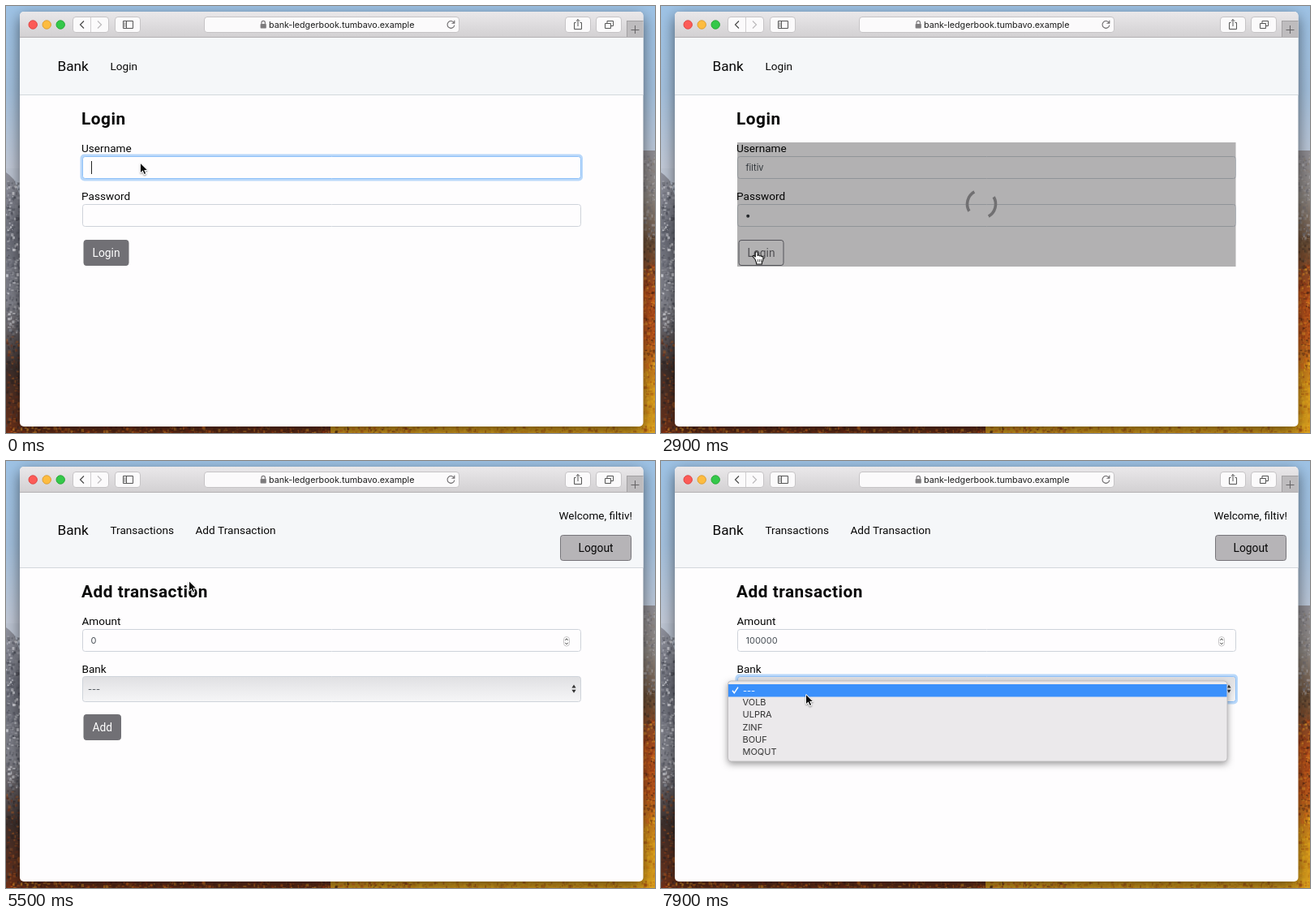
An HTML page with a canvas that plays this animation: 800x526 px, repeating every 8 s.

```html
<!DOCTYPE html>
<html lang="en">
<head>
<meta charset="utf-8">
<title>Bank login demo</title>
<style>
html, body { margin: 0; width: 100%; height: 100%; overflow: hidden; }
canvas { display: block; }
</style>
</head>
<body>
<canvas id="stage" width="800" height="526"></canvas>
<script>
const W = 800, H = 526, LOOP = 8000, STEP = 100;
const USER = 'filtiv', SITE = 'bank-ledgerbook.tumbavo.example';
const BANKS = ['VOLB', 'ULPRA', 'ZINF', 'BOUF', 'MOQUT'];
const ROBOTO = 'Roboto, sans-serif', INTER = 'Inter, sans-serif';
const PAGE = '#fefdfe', GREY = '#717075', LINE = '#ced3da', INK = '#495057';

const stage = document.getElementById('stage').getContext('2d');
const backdrop = document.createElement('canvas');
backdrop.width = W;
backdrop.height = H;
let c = backdrop.getContext('2d');

function box(x, y, w, h, r, fill, stroke) {
  c.beginPath();
  c.roundRect(x, y, w, h, r);
  if (fill) { c.fillStyle = fill; c.fill(); }
  if (stroke) { c.strokeStyle = stroke; c.lineWidth = 1; c.stroke(); }
}

function text(s, x, y, size = 13.6, { color = '#080808', weight = 400, family = ROBOTO, align = 'left', gap = 0 } = {}) {
  c.font = `${weight} ${size}px ${family}`;
  c.letterSpacing = gap + 'px';
  c.textAlign = align;
  c.fillStyle = color;
  c.fillText(s, x, y);
}

function path(d, stroke, width = 1, fill) {
  const p = new Path2D(d);
  if (fill) { c.fillStyle = fill; c.fill(p); }
  if (stroke) { c.strokeStyle = stroke; c.lineWidth = width; c.stroke(p); }
}

function fade(y0, y1, ...colors) {
  const g = c.createLinearGradient(0, y0, 0, y1);
  colors.forEach((col, i) => g.addColorStop(i / (colors.length - 1), col));
  return g;
}

// ---- desktop and browser window, drawn once ----
let seed = 7;
function rand() {
  seed = (seed * 16807) % 2147483647;
  return seed / 2147483647;
}

function speckle(x, y, w, h, count, colors) {
  for (let i = 0; i < count; i++) {
    c.globalAlpha = 0.2 + rand() * 0.5;
    c.fillStyle = colors[Math.floor(rand() * colors.length)];
    c.fillRect(x + rand() * w, y + rand() * h, 1 + rand() * 3, 1 + rand() * 3);
  }
  c.globalAlpha = 1;
}

function desktop() {
  const rock = ['#e0e1e6', '#43454f', '#8b8d96', '#5b5d68'];
  const leaves = ['#d9691c', '#8e2f12', '#e0932a', '#4d2413'];
  const gold = ['#f0b422', '#d98a14', '#a85312', '#e6a81c'];
  c.fillStyle = fade(0, 205, '#9ec3e6', '#a3c0dd', '#c3c9d6');
  c.fillRect(0, 0, W, H);
  c.fillStyle = fade(205, H, '#8f919c', '#6b6d78', '#80818a', '#3c2f2c', '#6b3018');
  c.fillRect(0, 205, 400, 321);
  c.fillStyle = fade(178, H, '#8e8c92', '#8a847f', '#6a4c34', '#a94b1c', '#b9561a', '#d0901c', '#dda31e');
  c.fillRect(400, 178, 400, 348);
  c.fillStyle = '#bcc4d2';
  path('M0 200H18V236L10 214L4 208L0 205Z', null, 1, '#bcc4d2');
  speckle(0, 215, 17, 190, 330, rock);
  speckle(0, 405, 17, 121, 170, ['#2c2322', '#7b3318', '#a95a24', '#4c4546']);
  speckle(785, 182, 15, 105, 150, ['#b2b0b4', '#6d6b70', '#8b8178']);
  speckle(785, 280, 15, 45, 70, ['#3d2d22', '#7e6246', '#5b432f']);
  speckle(785, 318, 15, 125, 220, leaves);
  speckle(785, 435, 15, 91, 150, gold);
  speckle(0, 518, 500, 8, 500, leaves);
  speckle(440, 518, 360, 8, 450, gold);
}

function roundButton(x, w) {
  box(x + 0.5, 13.5, w, 19, 3.5, '#fbfafb', '#c6c4c6');
}

function browser() {
  c.save();
  c.shadowColor = 'rgba(0,0,0,.55)';
  c.shadowBlur = 18;
  c.shadowOffsetY = 6;
  box(17, 7, 768.5, 511, 5, PAGE);
  c.restore();
  box(17, 7, 768.5, 32, [5, 5, 0, 0], fade(7, 39, '#eae8ea', '#d2d0d2'));
  c.fillStyle = '#b3b1b3';
  c.fillRect(17, 38, 768.5, 1);
  [['#fc5b57', '#df4744'], ['#fdbc40', '#de9f34'], ['#34c84a', '#27aa35']].forEach(([f, s], i) =>
    box(28 + i * 17, 17.8, 10.4, 10.4, 5.2, f, s));

  roundButton(82, 44);
  path('M104.5 14V32', '#d0ced0');
  path('M96 18.5L91.5 23L96 27.5', '#4a4a4a', 1.2);
  path('M113 18.5L117.5 23L113 27.5', '#bcbabc', 1.2);
  roundButton(134, 31);
  path('M144.5 18.5H156.5V27.5H144.5ZM148.5 18.5V27.5M145.5 21H147.5M145.5 23H147.5M145.5 25H147.5', '#555');
  roundButton(244, 314);
  path('M315 22V20.5A2.2 2.2 0 0 1 319.4 20.5V22', '#7d7b7d', 1.2);
  box(313.6, 22, 7.2, 5.6, 0.8, '#7d7b7d');
  text(SITE, 324, 27, 10.7, { family: INTER, color: '#1c1c1c' });
  path('M552.4 21A4.4 4.4 0 1 0 552.8 23.5M552.8 17.8V21.2H549.4', '#6c6a6c', 1.1);
  roundButton(689, 31);
  path('M702.5 20.5H700.5V28.5H709.5V20.5H707.5M705 25V16.5M702.7 18.8L705 16.5L707.3 18.8', '#555');
  roundButton(727, 31);
  path('M738.5 21.5H745.5V27.5H738.5ZM741 21V18.5H748.5V24.5H746', '#555');
  c.fillStyle = '#bebcbe';
  c.fillRect(765, 18, 20.5, 20);
  path('M765.5 18.5H785.5M765.5 18V38', '#a3a1a3');
  path('M775.5 24V34M770.5 29.5H780.5', '#656365');
}

// ---- page parts ----
const button = { x: 95.5 };

function nav(height, mid) {
  c.fillStyle = '#f5f7f9';
  c.fillRect(17, 39, 768.5, height);
  c.fillStyle = '#d3d8dc';
  c.fillRect(17, 39 + height, 768.5, 1);
  text('Bank', 63.5, mid + 6, 17.2);
}

function title(s, y) {
  text(s, 93, y, 20.8, { weight: 600, gap: 0.5 });
}

function ring(y, h) {
  box(91.5, y - 2.5, 619.5, h + 5, 5, '#b9d8fa');
}

function field(y, value, focus, caretX) {
  if (focus) ring(y, 28);
  box(94.5, y + 0.5, 614, 27, 3, PAGE, focus ? '#8fc1f8' : LINE);
  if (value) text(value, 104.5, y + 18, 11, { family: INTER, color: INK });
  if (focus) {
    const x = caretX || 105 + (value ? c.measureText(value).width : 0);
    c.fillStyle = '#222';
    c.fillRect(Math.round(x), y + 6, 1, 16);
  }
}

function mainButton(label, y, w, hover) {
  box(button.x + 0.5, y + 0.5, w - 1, 31, 3, hover ? PAGE : GREY, hover ? '#77767f' : GREY);
  text(label, button.x + w / 2, y + 20.7, 13.8, { align: 'center', color: hover ? GREY : '#fff' });
}

function loader(y, h, cy, t) {
  c.fillStyle = 'rgba(0,0,0,.3)';
  c.fillRect(94, y, 614.5, h);
  const turn = (t - 5000) / 1200 * Math.PI * 2;
  c.strokeStyle = '#717072';
  c.lineWidth = 3.6;
  for (const start of [-120, 60]) {
    const a = start * Math.PI / 180 + turn;
    c.beginPath();
    c.arc(395, cy, 17.5, a, a + Math.PI / 2);
    c.stroke();
  }
}

function keyIcon() {
  box(683.5, 253, 5.4, 5.4, 2.7, '#111');
  path('M686.2 257V263.5M686.2 261.5H687.8', '#111', 1.8);
  path('M690.6 257.2L693.2 259.8L695.8 257.2', '#111', 1.4);
}

function loginPage(t) {
  nav(70, 74);
  text('Login', 128.5, 79);
  title('Login', 145.8);
  text('Username', 93, 180);
  text('Password', 93, 239);
  field(185, t < 300 ? '' : t < 700 ? USER.slice(0, 2) : USER, t < 1000);
  const inPassword = t >= 1000 && t < 2600;
  field(244, '', inPassword, t < 1500 ? 105 : 110);
  if (t >= 1500) box(105.2, 256.7, 4, 4, 2, '#33383e');
  if (inPassword) keyIcon();
  mainButton('Login', 288, 56, t >= 2400);
  if (t >= 2900) loader(168, 153, 244, t);
}

function memberNav(t) {
  nav(92, 85);
  const over = t >= 4200 && t < 5200;
  text('Transactions', 128.5, 90);
  text('Add Transaction', 233.5, 90, 13.6, { color: over ? '#56585c' : '#080808' });
  text(`Welcome, ${USER}!`, 772, 72, 13.5, { align: 'right' });
  box(683.5, 91.5, 87, 31, 3, '#b6b4b7', '#77757a');
  text('Logout', 727, 112, 13.8, { align: 'center' });
}

function listPage() {
  title('Transactions', 167.5);
  const mids = [205, 412, 608];
  const center = { align: 'center' };
  c.fillStyle = '#d6dde3';
  for (const y of [191, 230, 271])
    for (const [x, w] of [[95, 220], [317, 190], [509, 198]]) c.fillRect(x, y, w, 1);
  ['Amount', 'Bank', 'Delete'].forEach((s, i) =>
    text(s, mids[i], 215, 14, { align: 'center', weight: 700, gap: 0.35 }));
  [100, 200].forEach((sum, i) => {
    const y = 255.7 + i * 41.4;
    text(sum, mids[0], y, 13.8, center);
    text(BANKS[i], mids[1], y, 13.8, center);
    box(587.5, y - 12.2, 41, 14, 3, '#fff', '#c4c2c4');
    text('Delete', mids[2], y - 1.8, 9.3, { align: 'center', family: INTER });
  });
}

function stepper() {
  box(687.5, 216.5, 7, 11.5, 3.5, '#fff', '#c8c6c8');
  path('M689.2 220.8L691 218.8L692.8 220.8M689.2 223.8L691 225.8L692.8 223.8', '#444');
}

function popup() {
  c.save();
  c.shadowColor = 'rgba(0,0,0,.42)';
  c.shadowBlur = 9;
  c.shadowOffsetY = 3;
  box(82.5, 271, 615.5, 99, 4, '#ebe9eb');
  c.restore();
  box(82.5, 271, 615.5, 99, 4, null, '#c0bec0');
  c.fillStyle = '#3a90fb';
  c.fillRect(83, 275, 614.5, 15.5);
  path('M88 282.8L90.3 285.8L95 278.6', '#fff', 1.5);
  text('---', 101, 286.5, 11, { family: INTER, color: '#fff' });
  BANKS.forEach((name, i) =>
    text(name, 100.5, 301 + i * 15.25, 11, { family: INTER, color: '#333' }));
}

function amountAt(t) {
  if (t < 6200) return '0';
  if (t < 6500) return '1';
  if (t < 6700) return '10';
  return '100000'.slice(0, Math.min(6, 3 + Math.floor((t - 6700) / STEP)));
}

function addPage(t) {
  title('Add transaction', 167.5);
  text('Amount', 93.5, 202);
  text('Bank', 93.5, 261);
  const open = t >= 7700;
  field(207, amountAt(t), t >= 5900 && !open);
  if (open) ring(265, 32);
  box(94.5, 265.5, 614, 31, 3, fade(265, 297, '#dfdfe2', '#ebebed', '#f6f6f7'), open ? '#8fc1f8' : LINE);
  text('---', 101, 284.5, 11, { family: INTER, color: INK });
  path('M697.4 279.5L700 275.5L702.6 279.5ZM697.4 281.8L700 285.8L702.6 281.8Z', null, 1, '#333');
  mainButton('Add', 312, 46.5);
  if (t < 5500) loader(189.5, 156.5, 260.5, t);
  stepper();
  if (open) popup();
}

// ---- pointer ----
const TRAIL = [
  [0, 166, 194], [1900, 166, 194], [2500, 118, 303], [3200, 118, 303], [3600, 176, 308], [3700, 176, 308],
  [4200, 282, 82], [5100, 282, 82], [5900, 170, 215], [7400, 170, 215], [7900, 179, 288]
];

function pointer(t) {
  if ((t >= 300 && t < 2000) || (t >= 6200 && t < 7500)) return;
  const i = Math.max(1, TRAIL.findIndex(p => p[0] >= t));
  const [t0, x0, y0] = TRAIL[i - 1], [t1, x1, y1] = TRAIL[i];
  const k = (t - t0) / (t1 - t0), e = k * k * (3 - 2 * k);
  c.save();
  c.translate(x0 + (x1 - x0) * e, y0 + (y1 - y0) * e);
  c.lineJoin = 'round';
  if (t >= 2400 && t < 3200) {
    path('M-2 9L-4.5 6.2Q-5.5 4.5-3.8 4.3L-1.7 6V1.2Q-1.6-.2-.3-.2Q1-.2 1.1 1.2V4.4Q2.8 3.4 3.7 5Q5.3 4.2 6 5.7Q8 5.2 8 7.3Q8 10.7 6.4 13V15H-.4V13.2Z', '#151515', 1.1, '#fff');
    path('M1.4 9V12.4M3.5 9V12.4M5.5 9V12.4', '#333', 0.8);
  } else {
    c.shadowColor = 'rgba(0,0,0,.35)';
    c.shadowBlur = 2;
    c.shadowOffsetY = 1;
    path('M0 0V11.3L2.5 9L4.4 13.4L6.5 12.5L4.6 8.2H8Z', '#fff', 1.6, '#fff');
    c.shadowColor = 'transparent';
    path('M0 .2V11L2.6 8.6L4.6 13L6.1 12.3L4.2 8H7.8Z', null, 1, '#0a0a0a');
  }
  c.restore();
}

function draw(now) {
  const t = Math.floor(now % LOOP / STEP) * STEP;
  c.drawImage(backdrop, 0, 0);
  if (t < 3200) loginPage(t);
  else {
    memberNav(t);
    if (t < 4900) listPage();
    else addPage(t);
  }
  pointer(t);
}

desktop();
browser();
c = stage;
const begin = performance.now();
(function tick() {
  draw(performance.now() - begin);
  requestAnimationFrame(tick);
})();
</script>
</body>
</html>
```
